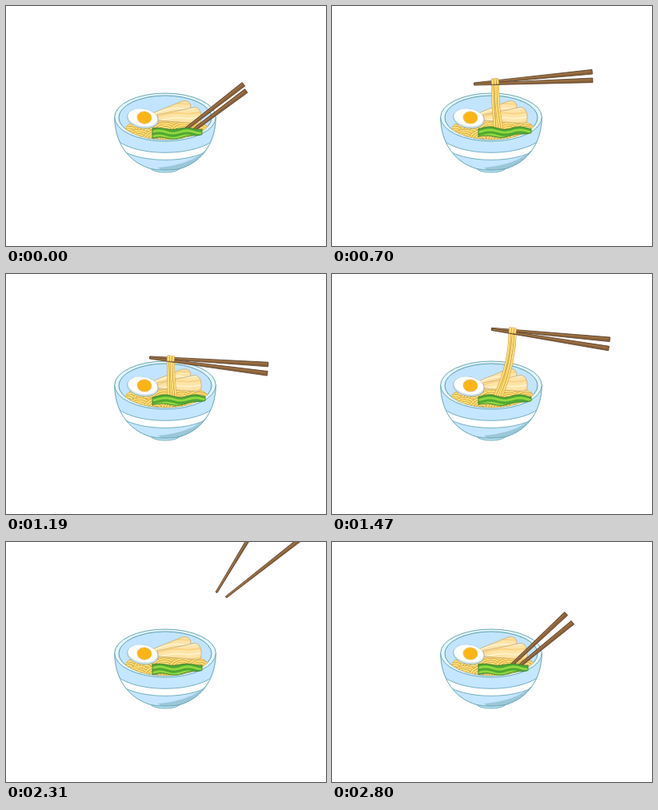
Recreate the animation shown at these times as an HTML page with a canvas. Size 400x300 px, loop 2870 ms.

```html
<!DOCTYPE html>
<html lang="en">
<head>
<meta charset="utf-8">
<title>Noodle bowl</title>
<style>
  html, body { margin: 0; width: 100%; height: 100%; overflow: hidden; background: #fff; }
  canvas { display: block; width: 400px; height: 300px; }
</style>
</head>
<body>
<canvas id="stage" width="400" height="300"></canvas>
<script>
const ctx = document.getElementById('stage').getContext('2d');
const LOOP = 2870, STEP = 70, STICK = 148;
const TEAL = '#5b9fab';

// Phase starts in ms.
const HELD = 560, PULL = 1190, RELEASE = 1470, GONE = 2030, ENTER = 2310, PLUNGED = 2800;

const clamp = (v, a = 0, b = 1) => Math.min(b, Math.max(a, v));
const smooth = v => { v = clamp(v); return v * v * (3 - 2 * v); };
const mix = (a, b, u) => a + (b - a) * u;

const pose = (x, y, upper, lower, dx = 0, dy = 1) => ({ x, y, upper, lower, dx, dy });
const dipped = pose(180, 188.5, -37.8, -36.7, 1.6, 6);
const held = pose(178, 97, -5.7, -2);
const lowered = pose(180, 104, 3.5, 7.5);
const entering = pose(263, 63, -58.9, -38, 12, 6);
const plunged = pose(185, 191, -43.3, -39.1, 1, 3);

function mixPose(a, b, u) {
  const out = {};
  for (const key in a) out[key] = mix(a[key], b[key], u);
  return out;
}

// Dip, lift, lower, accelerate away, come back spread open.
function stickPose(t) {
  if (t < HELD) return mixPose(dipped, held, smooth(t / HELD));
  if (t < PULL) return mixPose(held, lowered, smooth((t - HELD - 140) / (PULL - HELD - 140)));
  if (t < GONE) {
    const s = (t - PULL) / 1000;
    const tilt = 1.9 * smooth(s / 0.35);
    return pose(180 + 29 * s + 150 * s * s, 104 - 65 * s - 222 * s * s,
      lowered.upper + tilt, lowered.lower + tilt);
  }
  if (t < PLUNGED) return mixPose(entering, plunged, (t - ENTER) / (PLUNGED - ENTER));
  return mixPose(plunged, dipped, (t - PLUNGED) / (LOOP - PLUNGED));
}

function strandEnd(t) {
  const u = Math.max(0, t - RELEASE) / 420;
  return [208 + 75 * u * u, 152 - 149 * u * u];
}

function paint(path, fill, stroke, width = 0.8) {
  if (fill) { ctx.fillStyle = fill; ctx.fill(path); }
  if (stroke) { ctx.strokeStyle = stroke; ctx.lineWidth = width; ctx.stroke(path); }
}

function oval(x, y, rx, ry, turn = 0) {
  const path = new Path2D();
  path.ellipse(x, y, rx, ry, turn, 0, Math.PI * 2);
  return path;
}

function clipped(path, draw) {
  ctx.save();
  ctx.clip(path);
  draw();
  ctx.restore();
}

const body = new Path2D('M135.7 139 C136 170 152 195 181 203.5 Q199 207 217 203.5 C246 195 262 170 262.3 139 Z');
const band = new Path2D('M134 163 C155 190 243 190 264 163 L261 174 C240 198.5 158 198.5 137 174 Z');
const shade = new Path2D('M264 158 C252 186 230 198 190 202 L199 209 L262 190 Z');
const inner = oval(199, 139.5, 58, 27.5);
const slices = [
  new Path2D('M183 134 L220 119 Q228 117 231 124 L230 130 L191 140 Z'),
  new Path2D('M189 136 L236 126.5 Q243 127 244 137 Q245 147 239 147 L190 143 Z')
];

function drawBowl() {
  paint(oval(199, 202.5, 18, 5.5), '#c1e6fa', TEAL);
  paint(body, '#c5e6ff');
  clipped(body, () => {
    paint(band, '#fff', '#74b0bf', 1);
    ctx.globalAlpha = 0.75;
    paint(shade, '#8fbccb');
    ctx.globalAlpha = 1;
  });
  paint(body, null, TEAL, 0.9);
  paint(oval(199, 139, 63.3, 30), '#e4f5fc', TEAL, 0.9);
  paint(inner, '#c2e4ff', TEAL, 1);
}

function noodleLine(path, width = 2.2) {
  ctx.lineCap = 'round';
  paint(path, null, '#c3943e', width + 0.9);
  paint(path, null, '#ffdf74', width);
}

function drawNoodles(sway) {
  const bed = oval(201, 153, 51, 13.5);
  clipped(inner, () => {
    paint(bed, '#f5cf6c', '#c79a45', 0.8);
    clipped(bed, () => {
      for (let row = 0; row < 2; row++) {
        for (let x = 154 + row * 11; x < 256; x += 22) {
          const shift = sway * (row ? -1 : 1);
          for (let r = 15; r > 2; r -= 3.4) {
            noodleLine(oval(x + shift, 158 + row * 9 + shift * 0.4, r, r * 0.75, -0.15));
          }
        }
      }
    });
  });
}

function drawMeat() {
  for (const slice of slices) {
    paint(slice, '#ffe4a6');
    clipped(slice, () => {
      for (let k = 0; k < 5; k++) {
        const y = 122 + k * 6;
        paint(new Path2D(`M180 ${y + 8} Q205 ${y - 2} 220 ${y} T250 ${y - 3}`),
          null, k % 2 ? '#fff3d0' : '#fbd182', 1.7);
      }
    });
    paint(slice, null, '#c5aa78', 0.8);
  }
}

function drawEgg() {
  paint(oval(171, 140.7, 19.5, 12, 0.16), '#d5e2e9', '#81aebc', 0.8);
  paint(oval(171, 139.4, 18.6, 10.8, 0.16), '#fff');
  paint(oval(173, 139.5, 9, 7.6, 0.1), '#fcb515', '#e5b95c', 0.7);
}

function drawGreens(lift, sway) {
  const edge = (y, amp, phase) => u =>
    [183 + u * (62 + 4 * lift), y + amp * Math.sin(u * 11 + phase + sway * 0.3)];
  const top = edge(153.3 - 0.7 * lift, 1 + lift * 0.7, 3.6 - lift * 1.2);
  const low = u => {
    const [x, y] = edge(165.3 - 2 * lift, 1.3, 3)(u);
    return [x, y - 6 * u ** 4];
  };
  const trace = (path, f, from, to) => {
    for (let k = 0; k <= 24; k++) path.lineTo(...f(mix(from, to, k / 24)));
  };
  const leaf = new Path2D();
  trace(leaf, top, 0, 1);
  trace(leaf, low, 1, 0);
  leaf.closePath();
  paint(leaf, '#50a832');
  clipped(leaf, () => {
    for (const y of [157.5, 163.5]) {
      const stripe = new Path2D();
      trace(stripe, edge(y - lift, 1.6, 3.3 - lift), 0, 1);
      paint(stripe, null, '#90d940', 2.8);
    }
  });
  paint(leaf, null, '#3f7f2d', 0.9);
}

function drawStick(x, y, angle) {
  ctx.save();
  ctx.translate(x, y);
  ctx.rotate(angle * Math.PI / 180);
  paint(new Path2D(`M0 -1.1 L${STICK} -2.8 V2.8 L0 1.1 Z`), '#8a6138', '#57402a', 0.8);
  paint(new Path2D(`M1 -0.3 L${STICK - 2} -0.9`), null, '#aa7d4d', 0.9);
  ctx.restore();
}

function drawStrands(px, py, bx, by, free) {
  const bend = clamp((by - py) / 60) * 2;
  for (let k = 0; k < 4; k++) {
    const o = k - 1.5, uneven = free ? (k % 2) * 2 - 1 : 0;
    noodleLine(new Path2D(`M${px + o * 2.4} ${py} Q${px + o * 2.2 + bend * Math.sin(k * 2)}
      ${(py + by) / 2} ${bx + o * 3} ${by + uneven}`));
  }
}

function drawPinch(x, y, angle) {
  ctx.save();
  ctx.translate(x, y);
  ctx.rotate(angle * Math.PI / 180);
  for (let k = -1; k <= 1; k++) noodleLine(new Path2D(`M${k * 3.1} -2.5 V2.2`), 2.4);
  ctx.restore();
}

function drawUtensils(t) {
  const { x, y, upper, lower, dx, dy } = stickPose(t);
  const aboveSoup = new Path2D();
  aboveSoup.rect(0, 0, 400, 154);
  clipped(aboveSoup, () => {
    const turn = upper * Math.PI / 180;
    const px = x + 26 * Math.cos(turn), py = y + 26 * Math.sin(turn);
    const noodles = t < GONE && py < 151;
    if (noodles) drawStrands(px, py, ...strandEnd(t), t > RELEASE);
    drawStick(x, y, upper);
    drawStick(x + dx, y + dy, lower);
    if (noodles) drawPinch(px, py, upper);
  });
}

function render(t) {
  const lift = smooth((t - 200) / 350) * (1 - smooth((t - RELEASE) / 300));
  const sway = Math.sin(t / LOOP * Math.PI * 4) * 1.2;
  ctx.fillStyle = '#fff';
  ctx.fillRect(0, 0, 400, 300);
  drawBowl();
  drawNoodles(sway);
  drawMeat();
  drawEgg();
  drawUtensils(t);
  drawGreens(lift, sway);
}

const start = performance.now();
function tick() {
  const t = (performance.now() - start) % LOOP;
  render(Math.floor(t / STEP) * STEP);
  requestAnimationFrame(tick);
}
tick();
</script>
</body>
</html>
```
